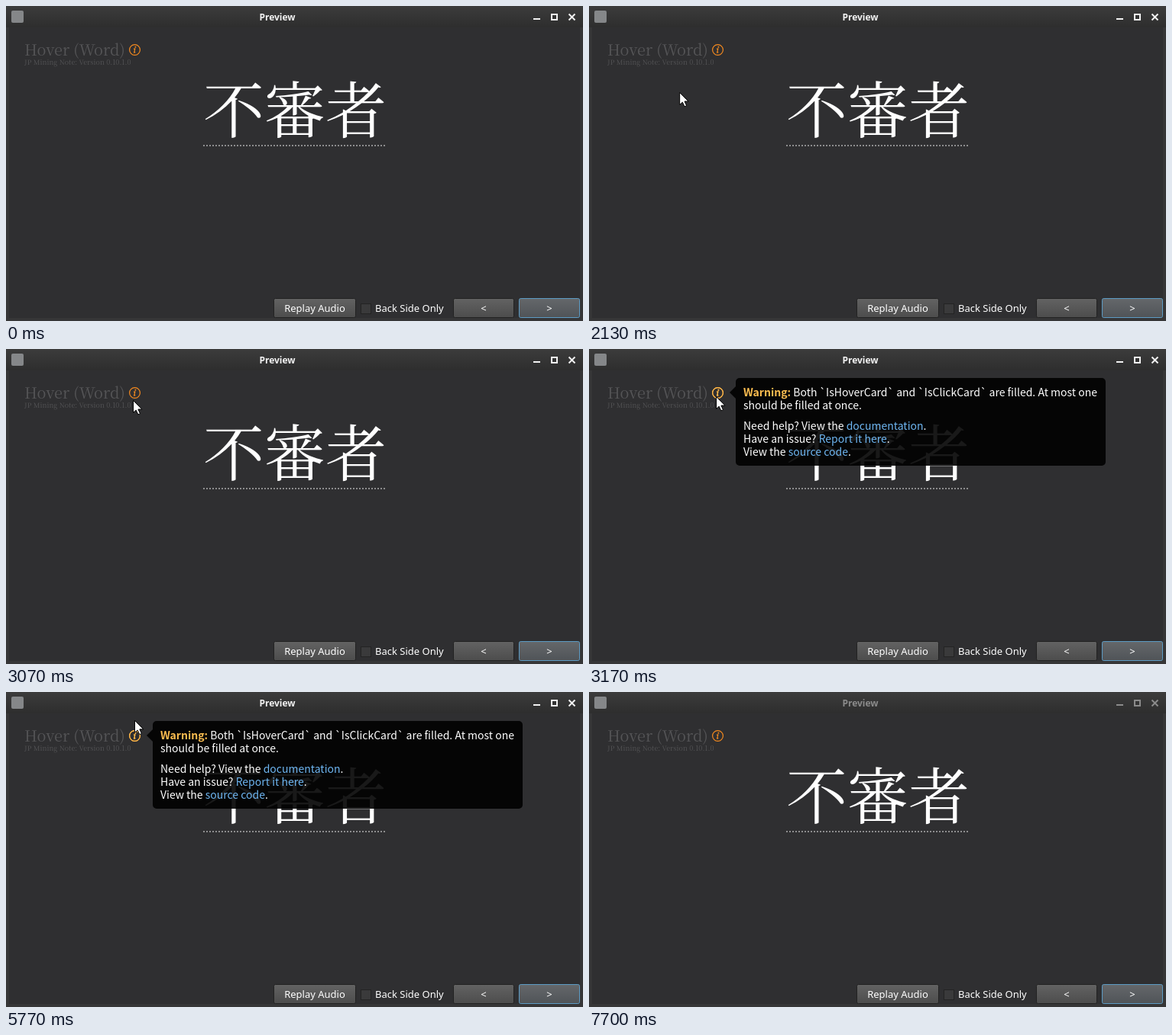
Recreate the animation shown at these times as an HTML page with a canvas. Size 755 by 413 pixels, loop 7.73 s.

```html
<!DOCTYPE html>
<html lang="ja">
<head>
<meta charset="utf-8">
<title>Preview</title>
<style>
html, body { margin: 0; width: 100%; height: 100%; overflow: hidden; background: #2f2f31; }
canvas { display: block; width: 755px; height: 413px; }
</style>
</head>
<body>
<canvas id="stage"></canvas>
<script>
const W = 755, H = 413, LOOP = 7730;
const UI = '"Noto Sans", "Open Sans", sans-serif';
const SERIF = '"Noto Serif CJK JP", "Noto Serif JP", "Noto Serif", "Noto Sans CJK JP", serif';
const TIP = '"Noto Sans CJK JP", "Noto Sans", sans-serif';
const LINK = '#6eb6f2', AMBER = '#fbbd50', ORANGE = '#f58a1f';

const canvas = document.getElementById('stage');
const ctx = canvas.getContext('2d');
const dpr = window.devicePixelRatio || 1;
canvas.width = W * dpr;
canvas.height = H * dpr;

// Pointer tip: time, x, y
const path = [
  [1700, 0, 124], [1900, 64, 122], [2130, 118, 113], [2300, 143, 101],
  [2470, 160, 88], [2500, 160, 87], [2800, 165, 73], [3070, 166, 67],
  [3170, 166, 62], [5100, 166, 62], [5300, 167, 55], [5600, 167, 55],
  [5770, 168, 37], [5880, 163, 12], [5980, 154, -20]
];

const clamp = v => Math.max(0, Math.min(1, v));
const ramp = (t, a, b) => clamp((t - a) / (b - a));

function rect(x, y, w, h, fill) {
  ctx.fillStyle = fill;
  ctx.fillRect(x, y, w, h);
}

function roundRect(x, y, w, h, r) {
  ctx.beginPath();
  ctx.roundRect(x, y, w, h, r);
}

function text(str, x, y, font, fill, align = 'left') {
  ctx.font = font;
  ctx.fillStyle = fill;
  ctx.textAlign = align;
  ctx.fillText(str, x, y);
}

function gradient(y0, y1, from, to) {
  const g = ctx.createLinearGradient(0, y0, 0, y1);
  g.addColorStop(0, from);
  g.addColorStop(1, to);
  return g;
}

function line(points, color, width) {
  ctx.beginPath();
  points.forEach(([x, y]) => ctx.lineTo(x, y));
  ctx.strokeStyle = color;
  ctx.lineWidth = width;
  ctx.stroke();
}

function drawWindow(active) {
  const ink = active ? '#f2f2f2' : '#8b8b8b';
  rect(0, 0, W, H, '#363637');
  rect(0, 0, W, 28, gradient(0, 28, '#3c3c3c', '#2e2e2e'));
  rect(4, 28, 747, 381, '#2f2f31');

  ctx.fillStyle = '#858789';
  roundRect(7, 6, 16, 16, 2);
  ctx.fill();

  text('Preview', 355, 19, 'bold 12px ' + UI, ink, 'center');
  rect(690, 16, 9, 2, ink);
  ctx.strokeStyle = ink;
  ctx.lineWidth = 2;
  ctx.strokeRect(714, 11, 7, 7);
  line([[736.5, 10.5], [744.5, 18.5]], ink, 2);
  line([[744.5, 10.5], [736.5, 18.5]], ink, 2);
}

function drawButton(label, x, w, focused) {
  const fill = focused
    ? gradient(384, 408, '#64676a', '#505458')
    : gradient(384, 408, '#626262', '#4d4d4d');
  roundRect(x + 0.5, 383.5, w - 1, 25, 2);
  ctx.fillStyle = fill;
  ctx.fill();
  ctx.strokeStyle = focused ? '#5d9cc5' : '#222';
  ctx.lineWidth = 1;
  ctx.stroke();
  text(label, x + w / 2, 401, '13px ' + UI, '#fff', 'center');
}

function drawControls() {
  drawButton('Replay Audio', 350, 108, false);
  drawButton('<', 585, 80, false);
  drawButton('>', 671, 80, true);
  rect(464, 390, 14, 14, '#232323');
  rect(465, 391, 12, 12, '#3a3a3b');
  text('Back Side Only', 483, 401, '13px ' + UI, '#fff');
}

function drawCard() {
  text('Hover (Word)', 24, 65, '20px ' + SERIF, '#555557');
  text('JP Mining Note: Version 0.10.1.0', 24, 77, '9px ' + SERIF, '#555557');
  text('不審者', 258, 166, '80px ' + SERIF, '#fff');
  for (let x = 258; x < 498; x += 4) rect(x, 182, 2, 2, '#8d8d8e');
}

function drawInfo(lit) {
  const paint = color => {
    ctx.beginPath();
    ctx.arc(168.5, 57.5, 6.9, 0, Math.PI * 2);
    ctx.strokeStyle = color;
    ctx.lineWidth = 1.2;
    ctx.stroke();
    line([[167, 56.3], [168.8, 56], [167.7, 61], [169.3, 60.6]], color, 1.2);
    ctx.beginPath();
    ctx.arc(169.4, 53.8, 0.95, 0, Math.PI * 2);
    ctx.fillStyle = color;
    ctx.fill();
  };
  paint(ORANGE);
  if (lit > 0) {
    ctx.globalAlpha = lit;
    paint(AMBER);
    ctx.globalAlpha = 1;
  }
}

// Draws a line of [string, colour, weight] runs
function runs(y, ...parts) {
  let x = 202;
  for (const [str, color = '#fff', weight = 'normal'] of parts) {
    text(str, x, y, `${weight} 14px ${TIP}`, color);
    x += ctx.measureText(str).width;
  }
}

function drawTooltip(alpha) {
  if (alpha <= 0) return;
  ctx.globalAlpha = alpha;
  ctx.fillStyle = 'rgba(0, 0, 0, 0.9)';
  roundRect(192, 38, 484, 115, 5);
  ctx.moveTo(192, 49);
  ctx.lineTo(184, 57);
  ctx.lineTo(192, 65);
  ctx.closePath();
  ctx.fill();
  runs(62, ['Warning:', AMBER, 'bold'],
    [' Both `IsHoverCard` and `IsClickCard` are filled. At most one']);
  runs(79, ['should be filled at once.']);
  runs(106, ['Need help? View the '], ['documentation', LINK], ['.']);
  runs(123, ['Have an issue? '], ['Report it here', LINK], ['.']);
  runs(140, ['View the '], ['source code', LINK], ['.']);
  ctx.globalAlpha = 1;
}

function drawPointer(t) {
  const i = path.findIndex(p => p[0] > t);
  if (i < 1) return;
  const [t0, x0, y0] = path[i - 1], [t1, x1, y1] = path[i];
  const k = ramp(t, t0, t1);
  ctx.save();
  ctx.translate(x0 + (x1 - x0) * k + 0.5, y0 + (y1 - y0) * k + 0.5);
  ctx.beginPath();
  [[0, 0], [0, 16], [3.7, 12.7], [6.3, 18.4], [9, 17.2], [6.4, 11.6], [11.4, 11.6]]
    .forEach(([x, y]) => ctx.lineTo(x, y));
  ctx.closePath();
  ctx.fillStyle = '#fff';
  ctx.fill();
  ctx.strokeStyle = '#000';
  ctx.lineWidth = 1;
  ctx.stroke();
  ctx.restore();
}

function draw(t) {
  const tip = ramp(t, 3080, 3170) * (1 - ramp(t, 5950, 6070));
  ctx.setTransform(dpr, 0, 0, dpr, 0, 0);
  drawWindow(t < 7700);
  drawControls();
  drawCard();
  drawInfo(tip);
  drawTooltip(tip);
  drawPointer(t);
}

const start = performance.now();
function tick() {
  draw((performance.now() - start) % LOOP);
  requestAnimationFrame(tick);
}
tick();
</script>
</body>
</html>
```
